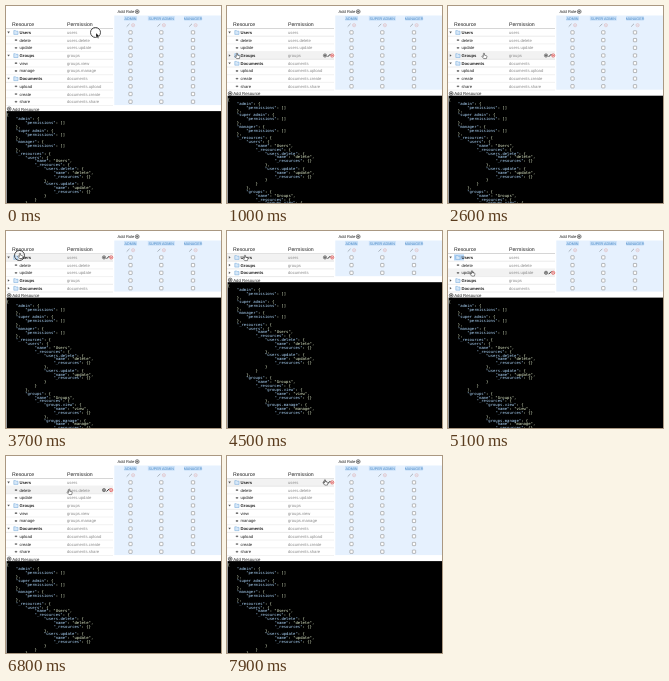
Animation of 215x197 px, one loop 8 s. Source, as an HTML page:

```html
<!DOCTYPE html>
<html lang="en">
<head>
<meta charset="utf-8">
<title>Roles and resources</title>
<style>
html, body { margin: 0; width: 100%; height: 100%; overflow: hidden; background: #fff; }
svg { display: block; width: 100vw; height: 100vh; }
text { font-family: "Liberation Sans", Arial, sans-serif; white-space: pre; text-rendering: geometricPrecision; }
.code text { font-family: "DejaVu Sans Mono", "Liberation Mono", monospace; font-size: 3.9px; fill: #e4f0cd; }
.code .key { fill: #acd6fb; }
</style>
</head>
<body>
<svg id="stage" viewBox="0 0 215 197" preserveAspectRatio="none"></svg>
<script>
const LOOP = 8000, STEP = 100;
const TOP = 26.4, ROW = 7.7, LINE = 3.83;
const ROLES = [["ADMIN", 124.5], ["SUPER ADMIN", 155.3], ["MANAGER", 187]];
const TREE = [
  ["Users", ["delete", "update"]],
  ["Groups", ["view", "manage"]],
  ["Documents", ["upload", "create", "share"]]
];
const stage = document.getElementById("stage");

function el(parent, tag, attrs, text) {
  const node = document.createElementNS("http://www.w3.org/2000/svg", tag);
  for (const k in attrs) node.setAttribute(k, attrs[k]);
  if (text !== undefined) node.textContent = text;
  parent.append(node);
  return node;
}
const label = (p, x, y, size, fill, s, more) =>
  el(p, "text", { x, y, "font-size": size, fill, ...more }, s);
const rect = (p, x, y, width, height, fill, more) =>
  el(p, "rect", { x, y, width, height, fill, ...more });
const line = (p, d, stroke, width) =>
  el(p, "path", { d, stroke, "stroke-width": width, fill: "none" });
const show = (node, on) => node.setAttribute("display", on ? "inline" : "none");
const move = (node, x, y) => node.setAttribute("transform", `translate(${x} ${y})`);

function plus(p, x, y, r, color) {
  el(p, "circle", { cx: x, cy: y, r, fill: "none", stroke: color, "stroke-width": 0.6 });
  line(p, `M${x - r * 0.6} ${y}h${r * 1.2}M${x} ${y - r * 0.6}v${r * 1.2}`, color, 0.6);
}
function minus(p, x, y, color) {
  el(p, "circle", { cx: x, cy: y, r: 1.6, fill: "none", stroke: color, "stroke-width": 0.6 });
  line(p, `M${x - 1} ${y}h2`, color, 0.6);
}
const pencil = (p, x, y, color) => line(p, `M${x - 1.4} ${y + 1.4}L${x + 1.4} ${y - 1.4}`, color, 1);

// Fixed headings
rect(stage, 0, 0, 215, 197, "#fff");
label(stage, 6, 19.8, 5.2, "#222", "Resource");
label(stage, 61, 19.8, 5.2, "#222", "Permission");
line(stage, "M0 22.5H107", "#bbb", 0.6);
label(stage, 111.5, 7, 4.1, "#222", "Add Role");
plus(stage, 131.2, 5.6, 1.9, "#333");
const panel = rect(stage, 108.3, 9.5, 106.7, 90, "#e6f1fe");
for (const [name, x] of ROLES) {
  const w = name.length * 2.35 + 1;
  rect(stage, x - w / 2, 10, w, 4.6, "#c9e0f8");
  label(stage, x, 13.5, 3.7, "#4b8ac6", name, { "text-anchor": "middle" });
  pencil(stage, x - 2.4, 19.2, "#a9b3bd");
  minus(stage, x + 2.6, 19.2, "#dfb9bd");
}

// Table rows
const rows = [];
function addRow(name, permission, group, parent) {
  const g = el(stage, "g", {});
  const back = rect(g, 0, -3.8, 107, ROW, "#f2f2f2");
  line(g, "M0 3.8H107", parent ? "#c9c9c9" : "#dedede", 0.4);
  let pick, caret;
  if (parent) {
    pick = rect(g, 6, -3, 23.5, 6, "#b4d5f7");
    caret = el(g, "path", { d: "M-1.3 -.8h2.6L0 1z", fill: "#555" });
    el(g, "path", { d: "M7.8 -1.8h1.6l.6.6h2v3.2H7.8z", fill: "#d7e8f8", stroke: "#6da5d8", "stroke-width": 0.5 });
  } else {
    el(g, "circle", { cx: 10, cy: 0, r: 0.85, fill: "#444" });
    line(g, "M8.4 0h3.2", "#777", 0.4);
  }
  label(g, 13.5, 1.5, 4.2, "#222", name, { "font-weight": parent ? 700 : 400 });
  label(g, 61, 1.5, 4.2, "#8c8c8c", permission);
  for (const [, x] of ROLES)
    rect(g, x - 1.65, -1.65, 3.3, 3.3, "#fff", { stroke: "#777", "stroke-width": 0.5, rx: 0.5 });
  const tools = el(g, "g", {});
  plus(tools, 98, 0, 1.6, "#333");
  pencil(tools, 102, 0, "#333");
  minus(tools, 105.2, 0, "#d33");
  rows.push({ g, back, pick, caret, tools, group, parent });
}
TREE.forEach(([name, kids], i) => {
  const id = name.toLowerCase();
  addRow(name, id, i, true);
  kids.forEach(k => addRow(k, `${id}.${k}`, i, false));
});

// Footer and JSON
const footer = el(stage, "g", {});
const code = el(footer, "g", { class: "code" });
rect(code, 0.6, 2, 214.4, 150, "#000");
plus(footer, 3.2, -0.2, 1.9, "#222");
label(footer, 6.2, 1.4, 4.3, "#222", "Add Resource");

const data = {};
for (const r of ["admin", "super admin", "manager"]) data[r] = { permissions: [] };
data._resources = {};
for (const [name, kids] of TREE) {
  const id = name.toLowerCase(), inner = {};
  for (const k of kids) inner[`${id}.${k}`] = { name: k, _resources: {} };
  data._resources[id] = { name, _resources: inner };
}
JSON.stringify(data, null, 4).split("\n").slice(0, 34).forEach((s, i) => {
  const t = el(code, "text", { x: 0.4 + s.search(/\S/) * 2.35, y: 7.3 + i * LINE });
  const cut = s.indexOf(":");
  if (cut < 0) t.textContent = s.trim();
  else {
    el(t, "tspan", { class: "key" }, s.slice(0, cut).trim());
    el(t, "tspan", {}, s.slice(cut));
  }
});

// Pointer
const ring = el(stage, "circle", { r: 5, fill: "none", stroke: "#222", "stroke-width": 0.8 });
const arrow = el(stage, "path", { d: "M0 0v4.6l1.1-1 .9 1.8.8-.4-.8-1.7h1.5z", fill: "#111", stroke: "#fff", "stroke-width": 0.3 });
const hand = el(stage, "path", {
  d: "M-.6 -2.6q.6-.7 1.1 0v1.8l2 .5q.6.3.4 1l-.5 1.9h-2.7l-1.8-2.2q0-.7.8-.4l.7.5z",
  fill: "#fff", stroke: "#222", "stroke-width": 0.5, "stroke-linejoin": "round"
});

// time, x, y
const PATH = [
  [0, 90, 27], [200, 90, 27], [1000, 10, 50], [1300, 10, 50], [1800, 54, 37],
  [2000, 52, 36], [2400, 34, 50], [2600, 36, 50], [3100, 24, 57], [3600, 14, 25],
  [4000, 14, 25], [4500, 18, 27], [4700, 18, 27], [5100, 24, 42.5], [5400, 24, 50],
  [5600, 25, 51], [6100, 24, 73], [6400, 25, 73], [6700, 62, 36], [7600, 98, 36], [7900, 98, 26.5]
];
// time of each toggle and its group
const TOGGLES = [
  [900, 1], [1300, 1], [2500, 1], [3200, 2], [3800, 0], [4700, 0], [5500, 1], [6400, 2]
];
// group, start, end and width of selected text
const PICKS = [[1, 1300, 2400, 23.5], [0, 4700, 5500, 10]];

function pointer(t) {
  const n = PATH.findIndex(p => p[0] > t);
  if (n < 0) return PATH[PATH.length - 1].slice(1);
  const a = PATH[n - 1], b = PATH[n];
  const u = (t - a[0]) / (b[0] - a[0]), e = u * u * (3 - 2 * u);
  return [a[1] + (b[1] - a[1]) * e, a[2] + (b[2] - a[2]) * e];
}

function draw(t) {
  const open = [true, true, true];
  for (const [at, g] of TOGGLES) if (t >= at) open[g] = !open[g];
  const [px, py] = pointer(t);
  const inTable = t >= 300 && px < 107;
  const picked = PICKS.find(p => t >= p[1] && t < p[2]);
  let n = 0, over = false;
  for (const r of rows) {
    const on = r.parent || open[r.group];
    show(r.g, on);
    if (!on) continue;
    const y = TOP + ROW * n++;
    const hover = inTable && py >= y - ROW / 2 && py < y + ROW / 2;
    over = over || hover;
    move(r.g, 0, y);
    show(r.back, hover);
    show(r.tools, hover);
    if (r.parent) {
      const lit = picked && picked[0] === r.group;
      r.pick.setAttribute("width", lit ? picked[3] : 0);
      r.caret.setAttribute("transform", `translate(2.6 0) rotate(${open[r.group] ? 0 : -90})`);
    }
  }
  const foot = TOP + ROW * n - 0.3;
  panel.setAttribute("height", foot - 4 - 9.5);
  move(footer, 0, foot);
  const click = t < 100 || TOGGLES.some(([at]) => t >= at - 100 && t < at);
  show(ring, click);
  move(ring, px - 0.5, py - 0.5);
  show(hand, over);
  show(arrow, !over);
  move(hand, px, py);
  move(arrow, px, py);
}

function tick(now) {
  draw(Math.floor((now % LOOP) / STEP) * STEP);
  requestAnimationFrame(tick);
}
draw(0);
requestAnimationFrame(tick);
</script>
</body>
</html>
```
